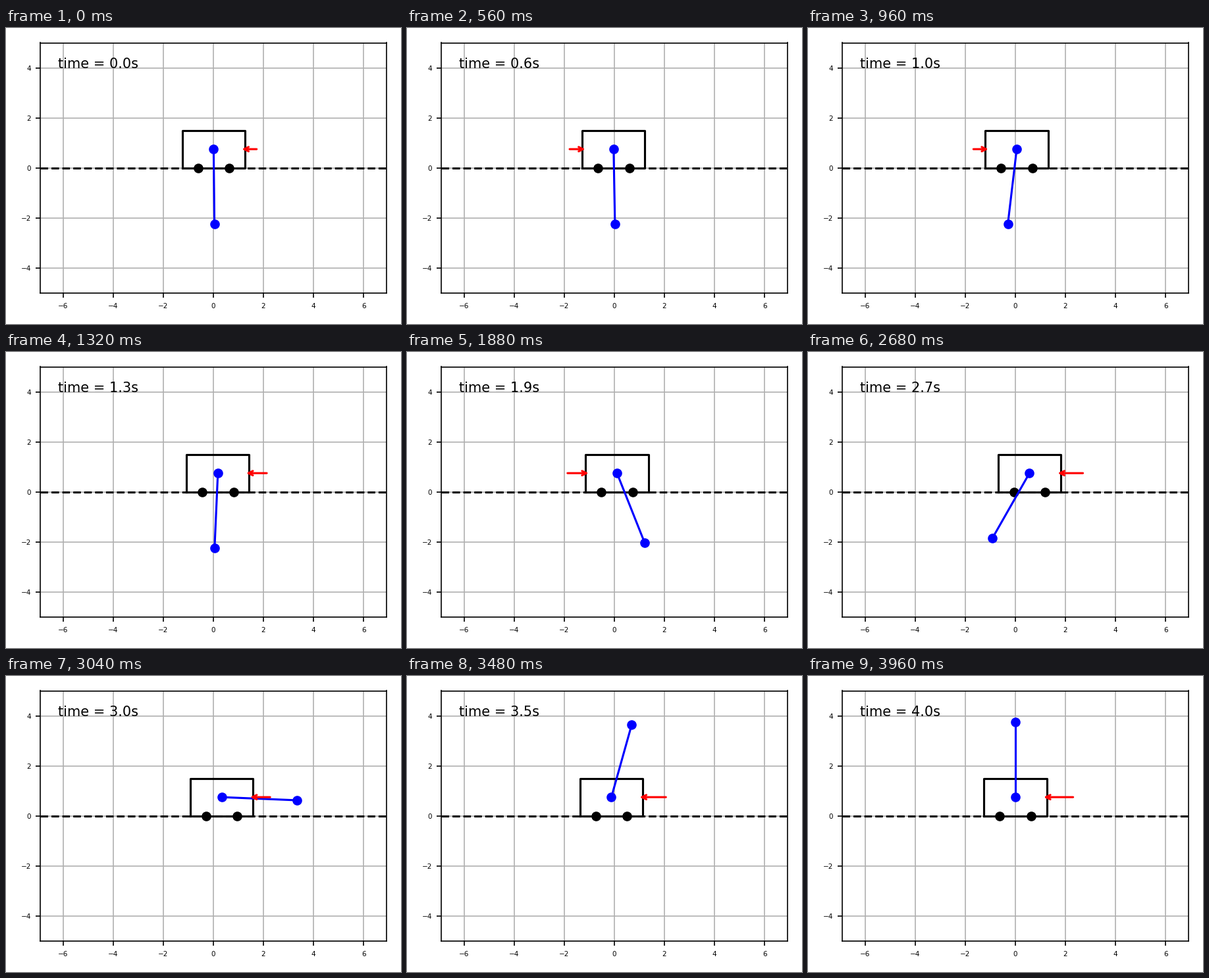
Recreate the animation shown at these times as a matplotlib script. Size 600 by 450 pixels, loop 4 s.

```python
import numpy as np
import matplotlib.pyplot as plt
from matplotlib.animation import FuncAnimation
from matplotlib.patches import FancyArrowPatch

plt.rcParams["font.family"] = "DejaVu Sans"

FRAMES, STEP = 100, 40
HALF_W, HEIGHT, POLE = 1.25, 1.5, 3.0
MID = HEIGHT / 2
ARROW_MIN, ARROW_TIP = 0.42, 0.12

# Key poses: time, cart position, pole angle from hanging straight down
POSES = np.array([
    (0.00, 0.01, 0.011), (0.56, -0.03, 0.018), (1.16, 0.12, -0.12),
    (1.32, 0.18, -0.044), (1.74, 0.115, 0.46), (1.88, 0.105, 0.378),
    (2.32, 0.305, -0.772), (2.50, 0.48, -0.92), (2.80, 0.55, 0.0),
    (3.04, 0.335, 1.529), (3.40, -0.10, 2.73), (3.70, -0.07, 3.06),
    (3.96, 0.0, np.pi),
])
# Pushes on the cart as bell-shaped pulses: centre time, strength, width
PULSES = np.array([
    (0.00, -0.05, 0.15), (0.70, 0.10, 0.25), (1.40, -0.40, 0.10),
    (2.10, 0.45, 0.25), (2.87, -4.6, 0.09), (3.25, 3.8, 0.105),
    (3.70, -1.8, 0.18),
])


def pose(t):
    """Cart position and pole angle on a smooth curve through the poses."""
    times, values = POSES[:, 0], POSES[:, 1:]
    slopes = np.gradient(values, times, axis=0)
    i = min(np.searchsorted(times, t, side="right"), len(times) - 1) - 1
    h = times[i + 1] - times[i]
    s = (t - times[i]) / h
    return ((1 + 2 * s) * (1 - s) ** 2 * values[i]
            + s * (1 - s) ** 2 * h * slopes[i]
            + s * s * (3 - 2 * s) * values[i + 1]
            + s * s * (s - 1) * h * slopes[i + 1])


def push_at(t):
    centre, strength, width = PULSES.T
    return np.sum(strength * np.exp(-((t - centre) / width) ** 2 / 2))


fig, ax = plt.subplots(figsize=(4, 3), dpi=150)
ax.set_xlim(-6.9, 6.9)
ax.set_ylim(-5, 5)
ax.set_xticks(range(-6, 7, 2))
ax.set_yticks(range(-4, 5, 2))
ax.tick_params(labelsize=5)
ax.grid(True)
fig.tight_layout()

# Equal scale on both axes
box = ax.get_window_extent()
half = 5 * box.width / box.height
ax.set_xlim(-half, half)

ax.plot([-half, half], [0, 0], "k--", lw=1.5)
body, = ax.plot([], [], "k-", lw=1.5)
wheels, = ax.plot([], [], "ko")
pole, = ax.plot([], [], "bo-", lw=1.5)
arrow = FancyArrowPatch((0, 0), (1, 0), arrowstyle="->", mutation_scale=8,
                        color="red", lw=1.5, shrinkA=0, shrinkB=0, zorder=3)
ax.add_patch(arrow)
clock = ax.text(0.05, 0.9, "", transform=ax.transAxes, fontsize=10)


def draw(i):
    t = i * STEP / 1000
    x, angle = pose(t)
    push = push_at(t)

    left, right = x - HALF_W, x + HALF_W
    body.set_data([left, right, right, left, left],
                  [0, 0, HEIGHT, HEIGHT, 0])
    wheels.set_data([x - HALF_W / 2, x + HALF_W / 2], [0, 0])
    pole.set_data([x, x + POLE * np.sin(angle)],
                  [MID, MID - POLE * np.cos(angle)])

    side = 1 if push >= 0 else -1
    edge = x - side * HALF_W
    tail = edge - side * (ARROW_MIN + abs(push))
    arrow.set_positions((tail, MID), (edge + side * ARROW_TIP, MID))
    clock.set_text(f"time = {t:.1f}s")
    return body, wheels, pole, arrow, clock


anim = FuncAnimation(fig, draw, frames=FRAMES, interval=STEP,
                     init_func=lambda: draw(0), repeat=True, repeat_delay=0)
plt.show()
```
